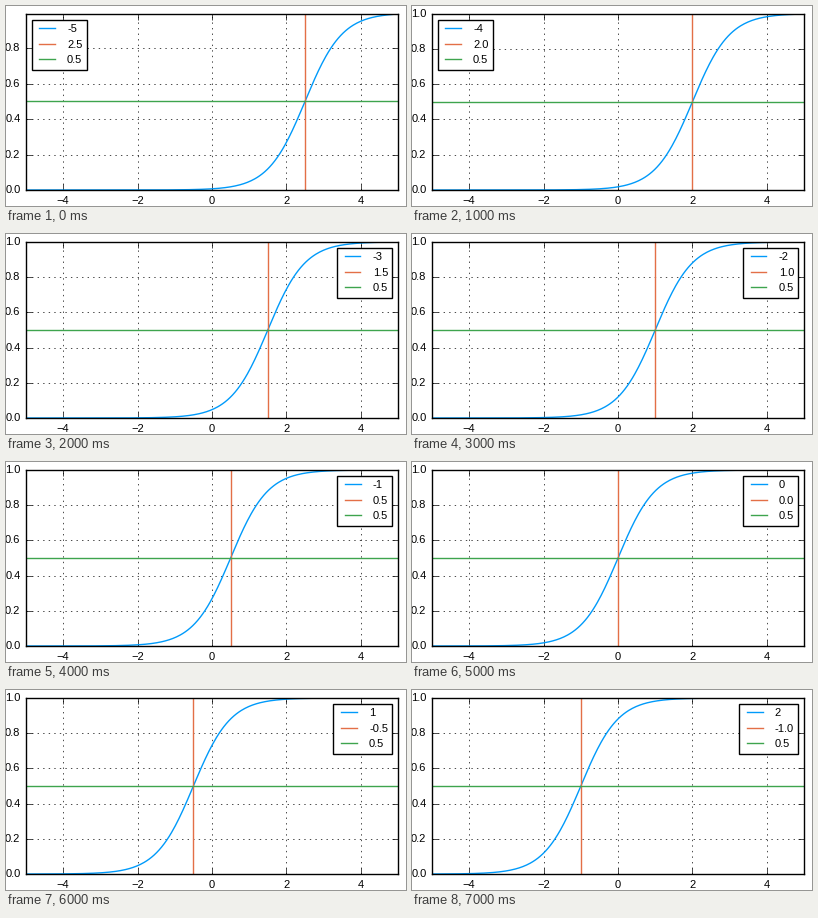
Recreate the animation shown at these times as a matplotlib script. Size 400 by 200 pixels, loop 8 s.

```python
import numpy as np
import matplotlib.pyplot as plt
from matplotlib.animation import FuncAnimation

BLUE, ORANGE, GREEN = "#009AFA", "#E36F47", "#3EA44E"
W, H = 400, 200
LEFT, RIGHT, TOP, BOTTOM = 20, 392, 8, 184
BIASES = range(-5, 3)

plt.style.use("classic")
plt.rcParams.update({"font.family": "Liberation Sans", "font.size": 8})

fig = plt.figure(figsize=(W / 100, H / 100), dpi=100, facecolor="white")
ax = fig.add_axes([LEFT / W, 1 - BOTTOM / H, (RIGHT - LEFT) / W, (BOTTOM - TOP) / H])
x = np.linspace(-5, 5, 300)


def sigmoid(z):
    return 1 / (1 + np.exp(-z))


def draw_y_axis(low, high):
    # A tick within half a pixel of the limits still counts as visible.
    slack = 0.5 * (high - low) / (BOTTOM - TOP)
    ticks = [v for v in np.arange(6) / 5 if low - slack <= v <= high + slack]
    ax.set_yticks(np.clip(ticks, low, high), labels=[""] * len(ticks))
    for v in ticks:
        ax.annotate(f"{v:.1f}", (0, v), xycoords=("axes fraction", "data"),
                    xytext=(-4, 0), textcoords="offset points",
                    ha="right", va="center", fontsize=8, annotation_clip=False)


def draw(i):
    ax.clear()
    bias = BIASES[i]
    middle = 0.0 - bias / 2
    y = sigmoid(2 * x + bias)

    ax.plot(x, y, color=BLUE, lw=1, label=str(bias))
    ax.axvline(middle, color=ORANGE, lw=1, label=f"{middle:.1f}")
    ax.axhline(0.5, color=GREEN, lw=1, label="0.5")

    ax.set_xticks(range(-4, 5, 2))
    ax.tick_params(labelsize=8)
    draw_y_axis(y[0], y[-1])
    ax.set_xlim(-5, 5)
    ax.set_ylim(y[0], y[-1])
    ax.grid(True)
    ax.set_axisbelow(True)
    ax.legend(loc="upper left" if bias < -3 else "upper right", fontsize=8)
    return []


anim = FuncAnimation(fig, draw, frames=len(BIASES), init_func=lambda: [],
                     interval=1000, repeat=True, repeat_delay=0)
plt.show()
```
